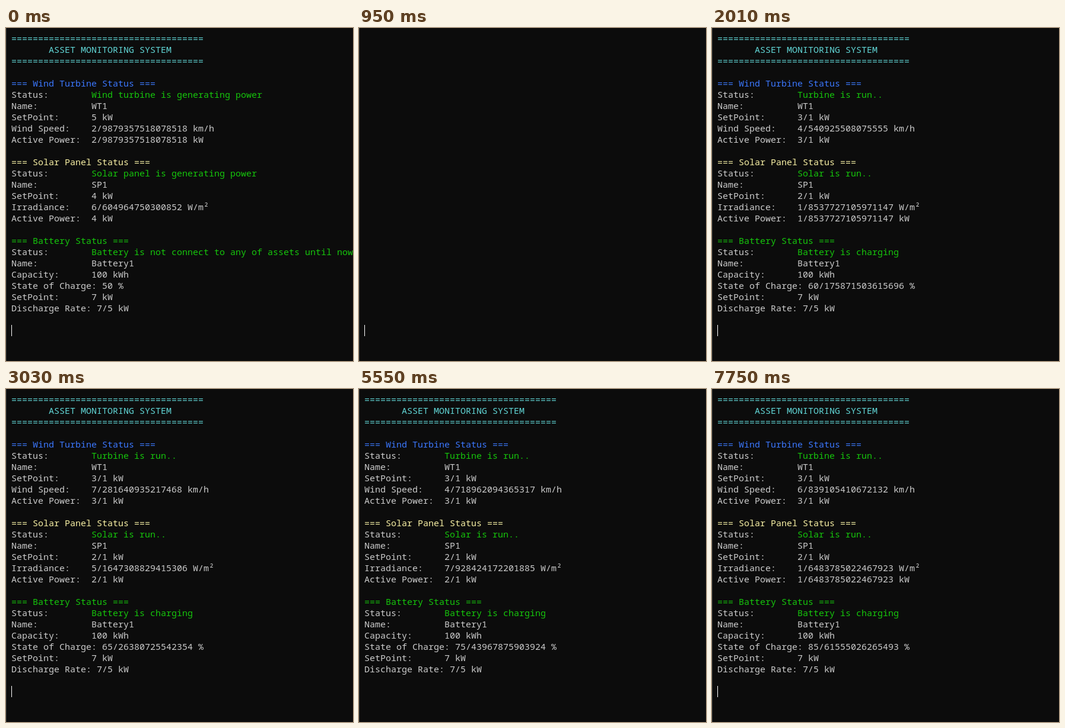
Recreate the animation shown at these times as an HTML page. Size 585 by 563 pixels, loop 8 s.

```html
<!DOCTYPE html>
<html lang="en">
<head>
<meta charset="utf-8">
<style>
  html, body { margin: 0; width: 100%; height: 100%; overflow: hidden; background: #0c0c0c; }
  body { position: relative; }
  #edge { position: absolute; left: 0; top: 0; width: 1px; height: 100%; background: #2b3131; }
  #screen {
    position: absolute; left: 9px; top: 8px; margin: 0;
    font: 500 15px/19px "Noto Sans Mono", "DejaVu Sans Mono", monospace;
    font-variant-ligatures: none; color: #ccc; white-space: pre;
  }
  #cursor { position: absolute; left: 9px; top: 502px; width: 1px; height: 19px; background: #fff; }
  .cyan { color: #61d6d6; }
  .blue { color: #3b78ff; }
  .yellow { color: #f9f1a5; }
  .green { color: #16c60c; }
</style>
</head>
<body>
<div id="edge"></div>
<pre id="screen"></pre>
<div id="cursor"></div>
<script>
const LOOP = 8000;
const screen = document.getElementById('screen');
const cursor = document.getElementById('cursor');

const idle = {
  windLimit: '5', sunLimit: '4',
  windStatus: 'Wind turbine is generating power',
  sunStatus: 'Solar panel is generating power',
  batteryStatus: 'Battery is not connect to any of assets until now'
};
const running = {
  windLimit: '3/1', sunLimit: '2/1',
  windStatus: 'Turbine is run..',
  sunStatus: 'Solar is run..',
  batteryStatus: 'Battery is charging'
};

// An update without readings is a cleared screen.
const updates = [
  { at: 0, ...idle, wind: '2/9879357518078518', sun: '6/604964750300852', charge: '50' },
  { at: 950 },
  { at: 1020, ...running, wind: '4/2067193845520318', sun: '1/4718036295518264', charge: '55/08793575180785' },
  { at: 2010, ...running, wind: '4/540925508075555', sun: '1/8537727105971147', charge: '60/175871503615696' },
  { at: 3030, ...running, wind: '7/281640935217468', sun: '5/1647308829415306', charge: '65/26380725542354' },
  { at: 4030, ...running, wind: '9/363591085843037', sun: '1/3342963044806178', charge: '70/35174300723139' },
  { at: 5020, ...running, wind: '4/718962094365317', sun: '7/928424172201885', charge: '75/43967875903924' },
  { at: 6010, ...running, wind: '5/9911955111290105', sun: '5/795061121014044', charge: '80/52761451084709' },
  { at: 7030, ...running, wind: '6/839105410672132', sun: '1/6483785022467923', charge: '85/61555026265493' }
];

// The cursor starts visible and flips at each of these times.
const blinks = [550, 950, 1150, 1680, 2210, 2760, 3290, 3890, 4420, 4950,
                5550, 6010, 6080, 6630, 7160, 7750];

const paint = (color, text) => `<span class="${color}">${text}</span>`;
const row = (label, value) => (label + ':').padEnd(15) + value;
const title = (color, name) => paint(color, `=== ${name} Status ===`);
const number = text => parseFloat(text.replace('/', '.'));
const lower = (a, b) => number(a) < number(b) ? a : b;

function source(color, heading, status, name, limit, label, value, unit) {
  return [
    title(color, heading),
    row('Status', paint('green', status)),
    row('Name', name),
    row('SetPoint', limit + ' kW'),
    row(label, `${value} ${unit}`),
    row('Active Power', lower(limit, value) + ' kW'),
    ''
  ];
}

function report(d) {
  if (!d.wind) return '';
  const rule = paint('cyan', '='.repeat(36));
  return [
    rule,
    paint('cyan', '       ASSET MONITORING SYSTEM'),
    rule,
    '',
    ...source('blue', 'Wind Turbine', d.windStatus, 'WT1', d.windLimit, 'Wind Speed', d.wind, 'km/h'),
    ...source('yellow', 'Solar Panel', d.sunStatus, 'SP1', d.sunLimit, 'Irradiance', d.sun, 'W/m²'),
    title('green', 'Battery'),
    row('Status', paint('green', d.batteryStatus)),
    row('Name', 'Battery1'),
    row('Capacity', '100 kWh'),
    `State of Charge: ${d.charge} %`,
    row('SetPoint', '7 kW'),
    'Discharge Rate: 7/5 kW'
  ].join('\n');
}

let shown;
function draw(now) {
  const t = now % LOOP;
  const current = updates.findLast(u => u.at <= t);
  if (current !== shown) {
    screen.innerHTML = report(current);
    shown = current;
  }
  const flips = blinks.filter(at => at <= t).length;
  cursor.style.visibility = flips % 2 ? 'hidden' : 'visible';
}

const start = performance.now();
function tick() {
  draw(performance.now() - start);
  requestAnimationFrame(tick);
}
tick();
</script>
</body>
</html>
```
